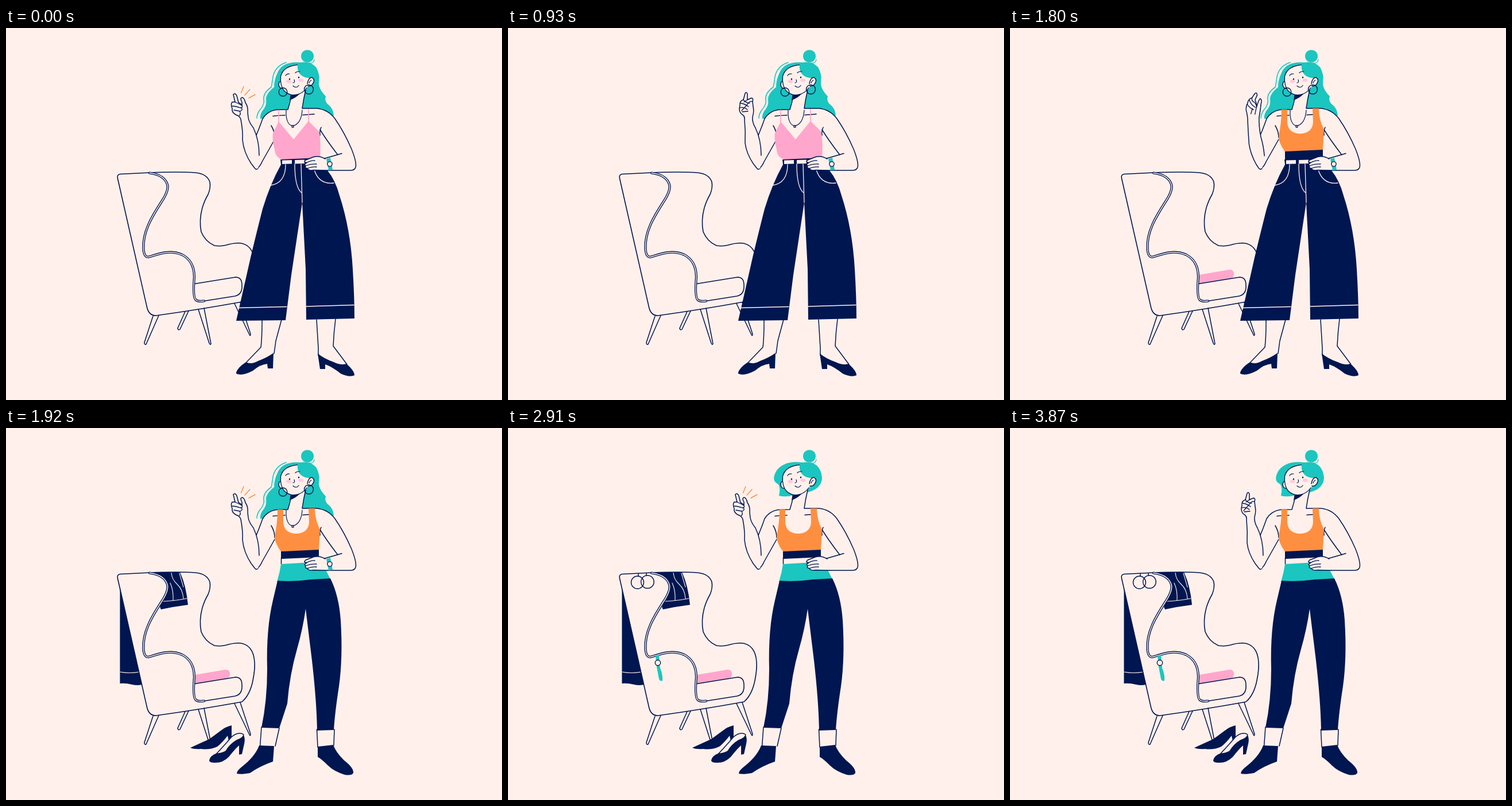
An HTML page with a canvas that plays this animation: 864 px wide and 648 px high, repeating every 3900 ms.

```html
<!DOCTYPE html>
<html lang="en">
<head>
<meta charset="utf-8">
<title>Snap and change</title>
<style>
html, body { margin: 0; width: 100%; height: 100%; overflow: hidden; background: #fff0eb; }
canvas { display: block; width: 100vw; height: 100vh; }
</style>
</head>
<body>
<canvas id="stage" width="864" height="648"></canvas>
<script>
(() => {
const ctx = document.getElementById('stage').getContext('2d');
const SKIN = '#fff0eb', NAVY = '#001650', TEAL = '#1ac6bf', PINK = '#ffa6cc', ORANGE = '#ff8f40';
const LOOP = 3900, STEP = 30, SNAPS = [0, 960, 1920, 2910];
const ELBOW = [436, 246];

ctx.lineCap = ctx.lineJoin = 'round';

function fill(d, color = NAVY) {
  ctx.fillStyle = color;
  ctx.fill(new Path2D(d));
}
function line(d, color = NAVY, width = 1.5) {
  ctx.strokeStyle = color;
  ctx.lineWidth = width;
  ctx.stroke(new Path2D(d));
}
function shape(d, color = SKIN) {
  fill(d, color);
  line(d);
}
function disc(x, y, rx, ry, color) {
  ctx.beginPath();
  ctx.ellipse(x, y, rx, ry, 0, 0, 7);
  ctx.fillStyle = color;
  ctx.fill();
}
function ring(x, y, r) {
  ctx.beginPath();
  ctx.arc(x, y, r, 0, 7);
  ctx.strokeStyle = NAVY;
  ctx.lineWidth = 1.4;
  ctx.stroke();
}

// Outfit: 0 pink top, 1 sports top, 2 leggings, 3 no jewellery
function chair(outfit) {
  if (outfit > 1) {
    fill('M198.5 278L237 447Q228 449 220 447Q208 444 198.5 445Z');
    line('M199 425Q215 428 232 425', SKIN, 1.2);
    fill('M258 251L303 251Q314 275 317 308Q293 311 270 316L263 300L282 278Z');
    line('M273 302Q295 301 315 297M288 252Q289 264 298 272Q308 281 309 297M286 270Q292 283 291 300M302 253L309 277', SKIN, 1.1);
    fill('M250 252Q276 256 282 270Q284 282 275 298L262 323L240 340L230 260Z', SKIN);
  }
  line('M256 502L241 548Q241 552 244 551L266 501M312 494L299 523Q300 527 303 525L318 493M335 490L354 549Q356 553 357 550L345 488M398 480L424 534Q426 538 426 533L408 478');
  line('M250 252L199 254.5Q193 255 194.5 262L245 484Q248 501 261 501Q340 490 411 477Q425 465 430 440Q434 420 433 408Q431 376 405 374.5Q393 375 384 378Q374 381 363 379Q347 372 340 355Q336 335 342 313Q346 300 352 290Q357 278 355 268Q350 254 330 252Q300 250 250 252', NAVY, 1.6);
  if (outfit > 0) fill('M329 430L382 421Q390 420 390 429Q390 435 384 436L329 445Z', PINK);
  line('M329 445.5L397 434.5Q411 432 411 448Q412 464 399 467L342 476', NAVY, 1.6);
  const wing = 'M250 252.5Q277 256 281.5 274Q283 285 270 304C254 329 238 355 239.5 384Q240 399 248 399C267 393 286 386 307 395Q328 406 328 434Q325 470 331 474Q335 477 345 475.5';
  line(wing, NAVY, 4.2);
  line(wing, SKIN, 1.5);
  if (outfit > 1) {
    fill('M321 557Q345 546 354 542L373 528Q383 520 393 518L393 538L388 545L386 536Q376 549 368 555Q355 561 340 559Q328 560 321 557Z');
    fill('M354 579Q355 571 368 566L403 541L414 535Q417 541 415 550L411 568L406 569L406 553Q399 559 388 573Q377 584 363 583Q354 583 354 579Z');
    shape('M367 567Q382 551 393 538Q405 528 414 534Q413 540 402 544Q390 551 383 563Q374 568 367 567Z');
  }
  if (outfit > 2) {
    line('M227 254V258M241 253V257');
    ring(225.5, 269, 11);
    ring(243, 268, 11.3);
    fill('M257 396L263 395L265 418Q270 430 269 440Q265 442 263 437L259 416Z', TEAL);
    disc(261, 409, 5, 5, SKIN);
    ring(261, 409, 4.7);
  }
}

function hairBack(outfit) {
  if (outfit < 3) {
    line('M488 60Q469 66 465 85Q463 100 462 103Q448 113 449 124Q451 133 442 143Q437 150 437 157', TEAL, 1.6);
    fill('M512 60Q481 58 473 78Q467 90 467 103Q452 115 453 125Q455 135 446 145Q442 152 443 158L571 153Q570 140 562 134Q554 128 557 119Q546 108 545 98Q547 80 540 68Q528 58 512 60Z', TEAL);
  } else {
    fill('M512 60Q482 56 468 74Q457 92 471 98Q475 105 472 118Q484 121 498 117L522 112Q546 106 547 87Q545 66 530 61Z', TEAL);
  }
}

function torso() {
  fill('M490 142L466 143Q452 147 444 162L434 190L436 246L468 194L480 237L548 237L547 178L578 221L552 229L556 248L600 248Q611 248 609 236Q603 205 583 174Q567 146 548 140L517 140Z', SKIN);
  fill('M497 112L491 143L516 143L522 106Z', SKIN);
  line('M497 117Q495 130 491 142L470 142.5Q455 145 447 158Q440 178 434.5 190M522 108Q518 125 516 140L542 140Q561 142 573 158Q589 181 602 211Q610 231 609.5 240Q609 248 600 248L560 248');
  line('M436 246Q443 241 446 233L468 194M462 170Q468 180 468 191M549 173Q546 179 547 187M547 177Q558 195 578 221M585 218.5Q570 223 552 228');
  line('M465 153.5Q475 152 486 152M517 151.5L537 150');
  fill('M496 114L511 115Q506 121 494 126Z');
}

function face(outfit) {
  shape('M483 93Q475 91 475 99Q476 106 483 105');
  fill('M509 63Q482 65 478.5 84Q476 101 485 110Q495 119 507 116Q520 113 527 101L534 82Z', SKIN);
  line('M509 64Q483 66 478.5 84Q477 101 485 110Q495 119 507 116Q518 113 524 104', NAVY, 1.3);
  fill('M508 63Q506 82 523 86.5Q534 89 541 84L546 88Q544 67 530 61Q516 57 508 63Z', TEAL);
  disc(525, 49, 11, 10.8, TEAL);
  line('M528 61Q536 62 537 55', TEAL, 1.3);
  shape('M525 97Q527 86 533 86Q539 90 535 96Q532 102 526 101');
  line('M528 96Q529 92 532 91', NAVY, 1.1);
  disc(492, 93, 4.5, 2.7, '#ffc9dd');
  disc(514, 91, 4.5, 2.7, '#ffc9dd');
  disc(494, 89, 1.2, 1.5, NAVY);
  disc(510, 86, 1.2, 1.5, NAVY);
  line('M487 83Q489 79 494 80M504 78Q507 75 512 76M502 90Q504 95 500 95.5M500 101Q506 106 510 100', NAVY, 1.2);
  if (outfit < 3) {
    ring(482.5, 111.5, 7.3);
    ring(527.5, 107, 8);
    line('M488 143C487 160 492 170 499 170C508 170 515 160 516 143', NAVY, 1.2);
    disc(499.5, 171.5, 2, 2.3, SKIN);
    ring(499.5, 171.5, 1.7);
  }
}

function shirt(outfit) {
  if (outfit === 0) {
    line('M475 143V166M527 142V165', PINK, 1.6);
    fill('M475 163L501 194L527 162L546 181Q549 205 547 228L482 229Q469 226 468 212Q463 192 465 183Z', PINK);
    return;
  }
  fill('M473 142L483 142L483 165Q485 184 506 184Q526 183 528 165L527 140L538 140Q538 160 547 177L545 213L479 215Q468 201 468 188Q473 165 473 142Z', ORANGE);
  fill(outfit === 1 ? 'M479 215L545 212V231L479 232Z' : 'M479 215L545 212V225L479 228Z');
  if (outfit > 1) line('M479.5 226V237M545 225V229');
}

function widePants() {
  line('M446 509Q446 540 444 556L419 582M480 508Q474 530 470 545L467 567M541 508L544 557V570M574 507Q571 530 570 554L594 586');
  fill('M401 600Q404 591 418 582Q427 587 439 580Q455 574 466 566L465 593L456 593L455 585Q443 586 430 597Q411 607 401 602Z');
  fill('M543 567Q554 576 571 582Q583 588 593 585Q607 597 607 605Q598 609 583 602Q568 590 556 586L556 594L547 594Z');
  fill('M478 229L546 226L559 247Q574 265 581 292Q600 350 604 420Q607 470 607 506L523 508L522 420L516 304L497 430L487 509L401 510Q417 440 426 400Q438 350 447 315Q460 272 479 238Z');
  fill('M481 230.5L498 230V236.5L481 237ZM503 230L520 229.5V236L503 236.5Z', SKIN);
  line('M405 487.5L489 485.5M523 485L606 482.5M487 238Q487 270 461 274M537 247Q545 273 571 270M503 237Q503 278 515 287M514 237L516 304', SKIN, 1.3);
}

function leggings() {
  line('M445 521L442.5 555M476 523L469 554M541.5 525L543 556M572 525L571 553');
  fill('M479 237L549 233Q557 247 565 263L520 268L472 268Q477 252 479 237Z', TEAL);
  fill('M473 266Q502 268 530 264L565 262Q580 292 583 335Q587 400 580 450Q573 495 571 526L542 527Q541 475 533 405L522 315Q517 350 507 385Q494 430 490 480L476 523L445 522Q455 475 455 420Q453 350 465 300Z');
  fill('M441 553L467 554L465 581Q442 589 425 601Q409 604 402 602Q402 597 411 590Q434 572 441 553Z');
  fill('M543 555L570 552Q574 564 589 579Q606 592 605 601Q602 606 590 604Q571 598 561 588Q549 576 543 573Z');
}

function hipHand(outfit) {
  shape('M556 228Q546 222 536 224.5L522 230Q517 234 524 234.5Q518 238 522 240Q520 244 525 244.5Q527 249 536 247.5L560 248');
  line('M524 234.5Q532 230 538 231M522 240Q532 236 541 237M525 244.5Q533 241 541 242', NAVY, 1.3);
  if (outfit < 3) {
    fill('M558 228L565 226L569 247L562 248Z', TEAL);
    disc(564, 237, 4.4, 4.4, SKIN);
    ring(564, 237, 4.1);
  }
}

// Forearm outline from the inner elbow, round the hand, to the elbow; then the finger lines
const POSES = {
  open: ['M441 222Q441 195 431 174Q423 164 422 156Q421 150 421 142Q421 136 417 130Q415 121 411 121Q407 122 411 129L411 135Q410 132 405 130L402 118Q399 112 396 116L399 129L394 129Q391 133 394 140Q393 147 400 151Q407 153 409 159Q413 180 412 195Q414 216 427 236L434 245Q436 247 439 245',
    'M399 129Q406 132 411 135Q413 139 408 139Q400 136 394 136M410 139Q413 143 408 145L397 143M407 145Q410 150 406 153'],
  pinch: ['M441 222Q441 195 431 174Q425 164 426 155Q429 145 427 137L426 128Q428 122 424 122L417 125V115Q415 110 413 114L410 125Q403 127 404 135Q401 145 407 150Q413 153 412 160Q414 180 413 200Q415 218 427 236L434 245Q436 247 439 245',
    'M410 125Q415 131 421 131M405 131Q413 132 419 137M404 139Q410 137 417 142M426 128Q420 127 417 133L407 144M411 129L417 125M408 146L418 145'],
  ready: ['M444 223Q443 205 439 190Q436 173 437 156Q440 142 441 133Q444 125 440 123Q437 126 433 138Q434 131 431 125L435 117Q435 111 431 114L426 121Q419 123 418 130Q413 139 416 147L417 156Q417 180 418 202Q420 219 429 237L434 245Q436 247 439 245',
    'M426 121Q424 127 430 129L434 136M421 125Q424 134 431 138M417 132Q422 140 428 142M426 140L423 149M433 138L430 150']
};

function forearm(pose, degrees) {
  const [outline, fingers] = POSES[pose];
  ctx.save();
  ctx.translate(...ELBOW);
  ctx.rotate(degrees * Math.PI / 180);
  ctx.translate(-ELBOW[0], -ELBOW[1]);
  shape(outline);
  line(fingers, NAVY, 1.3);
  ctx.restore();
}

// since: time after the latest snap, until: time to the next one
function snapArm(since, until) {
  if (until <= 60) return forearm('pinch', Math.max(0, until - 30) / 10);
  if (until <= 120) return forearm('ready', -(150 - until) / 15);
  if (since <= 60) return forearm('open', -since / 20);
  const u = Math.min(1, (since - 60) / 240), ease = 1 - (1 - u) ** 2;
  if (since < 150) forearm('open', -3 + 9 * ease);
  else forearm('ready', -12 * (1 - ease));
}

function sparks(since) {
  const k = since / 120;
  if (k >= 1) return;
  for (const [x, y, dx, dy] of [[409.5, 113, 4.5, -11], [416, 117, 9, -10], [423, 122, 11, -6]]) {
    const a = k * 2.4, b = 1 + k * 1.4;
    line(`M${x + dx * a} ${y + dy * a}L${x + dx * b} ${y + dy * b}`, ORANGE);
  }
}

function draw(t) {
  const outfit = SNAPS.filter(s => s <= t).length - 1;
  const since = t - SNAPS[outfit];
  const until = (SNAPS[outfit + 1] || LOOP) - t;
  ctx.fillStyle = SKIN;
  ctx.fillRect(0, 0, 864, 648);
  chair(outfit);
  hairBack(outfit);
  torso();
  shirt(outfit);
  face(outfit);
  if (outfit < 2) widePants(); else leggings();
  hipHand(outfit);
  snapArm(since, until);
  sparks(since);
}

const start = performance.now();
function tick() {
  const t = (performance.now() - start) % LOOP;
  draw(Math.floor(t / STEP) * STEP);
  requestAnimationFrame(tick);
}
tick();
})();
</script>
</body>
</html>
```
